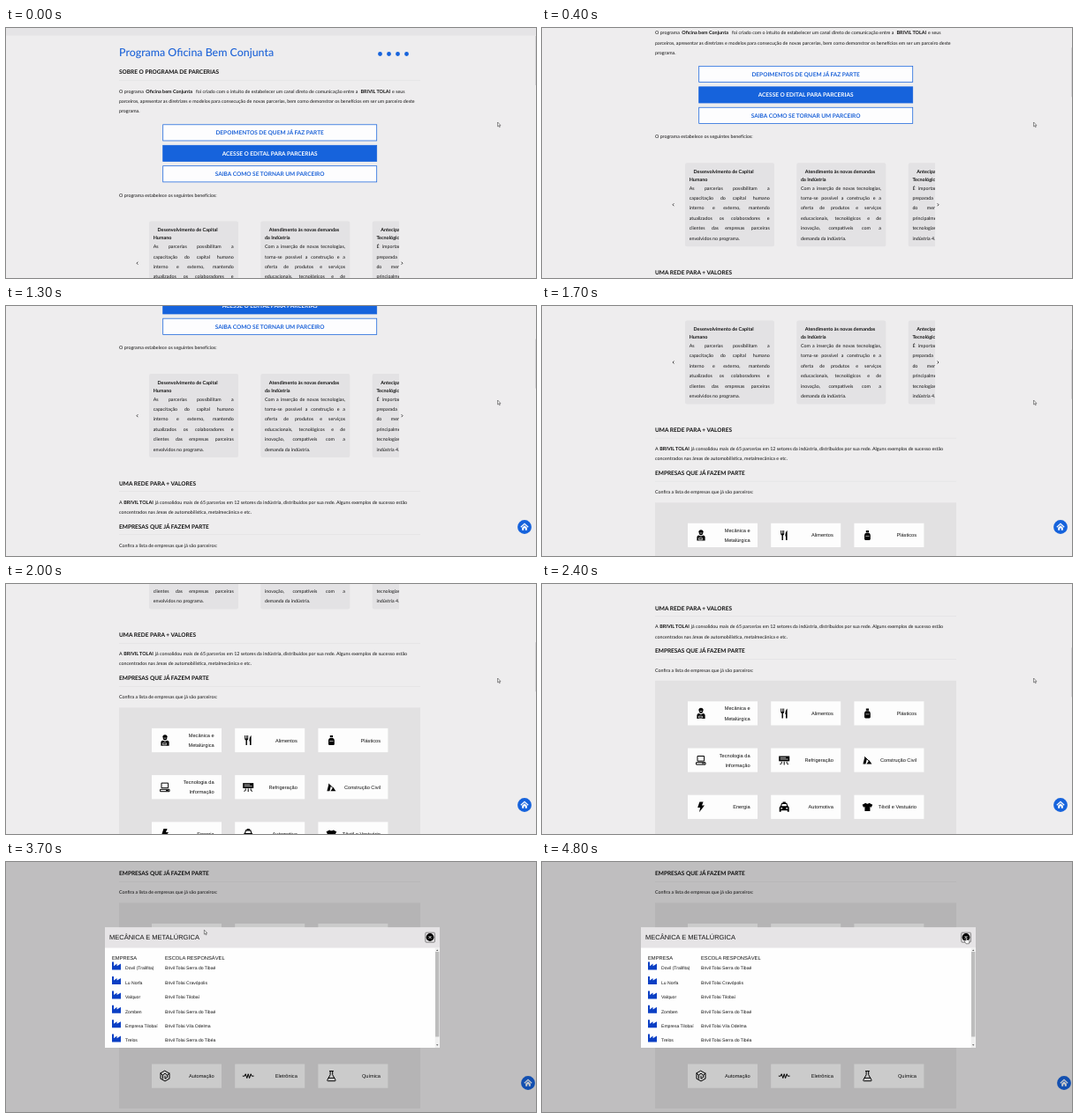
An HTML page for the animation above (5 s loop, 600 by 284 pixels).

```html
<!DOCTYPE html>
<html lang="pt-BR">
<head>
<meta charset="utf-8">
<title>Programa de parcerias</title>
<style>
  html, body { margin: 0; width: 100%; height: 100%; overflow: hidden; background: #eeedee; }
  svg { display: block; width: 100%; height: 100%; }
  text { font: 5.33px Lato, sans-serif; fill: #111; text-rendering: geometricPrecision; white-space: pre; }
  .bold, .head, .button { font-weight: 700; }
  .bold { font-size: 5.45px; }
  .head, .button { font-size: 6.5px; }
  .title { font-size: 12.4px; font-weight: 500; fill: #1d63d8; }
  .button { text-anchor: middle; fill: #1d63d8; }
  .filled { fill: #fff; }
  .sector, .cell, .column, .dialog { font-family: "Liberation Sans", Arial, sans-serif; }
  .sector { font-size: 5.65px; text-anchor: end; }
  .cell { font-size: 5.07px; }
  .column { font-size: 5.77px; }
  .dialog { font-size: 7.5px; }
  .line { fill: none; stroke: #000; stroke-width: 1; stroke-linejoin: round; stroke-linecap: round; }
</style>
</head>
<body>
<svg id="stage" viewBox="0 0 600 284" xmlns="http://www.w3.org/2000/svg"></svg>
<script>
const BLUE = '#1663dc';
const stage = document.getElementById('stage');

// y is the vertical middle of the capitals
const text = (x, y, str, cls = '', attrs = '') =>
  `<text x="${x}" y="${y}" dy=".35em" class="${cls}" ${attrs}>${str}</text>`;
const rect = (x, y, w, h, fill, attrs = '') =>
  `<rect x="${x}" y="${y}" width="${w}" height="${h}" fill="${fill}" ${attrs}/>`;
const bold = (str, x, next) =>
  `<tspan class="bold" x="${x}">${str}</tspan><tspan x="${next}">`;
const rule = y => rect(128, y, 341, 0.6, '#e0dfe1');

function button(y, label, filled) {
  return rect(177.7, y, 242, 18.2, filled ? BLUE : '#fdfdfe', `stroke="${BLUE}" stroke-width=".75"`) +
    text(298.6, y + 9.3, label, filled ? 'button filled' : 'button');
}

function benefit(x, heading, lines) {
  const body = lines.map((line, i) => {
    const last = i === lines.length - 1;
    return text(x + 4.7, 248.3 + i * 11.4, line, '', last ? '' : 'data-justify="91"');
  });
  return rect(x, 219.6, 101, 95, '#e3e2e4', 'rx="2"') +
    text(x + 9.5, 229.2, heading[0], 'bold') +
    text(x + 4.7, 238.3, heading[1], 'bold') + body.join('');
}

// Icons are drawn around 0,0
const sectors = [
  ['Mecânica e|Metalúrgica', '<path d="M-2.8-3.2Q-2.6-6.2 0-6.2T2.8-3.2H2.2V-1.6Q1.4 0 0 0T-2.2-1.6V-3.2zM-4.6 6.2V2Q-4.4.4-2.4.2L0 1.4 2.4.2Q4.4.4 4.6 2V6.2z"/><path d="M-1.2-2.4H1.2M-2.6 3.2H1.4V5.2H-2.6z" stroke="#fff" fill="none" stroke-width=".7"/>'],
  ['Alimentos', '<path d="M-4-5.5V-2Q-4 0-2.7 0V5.5H-1.3V0Q0 0 0-2V-5.5H-.8V-2H-1.5V-5.5H-2.4V-2H-3.2V-5.5zM1.8 5.5H3.4V-5.5Q1.2-4 1.2 1H1.8z"/>'],
  ['Plásticos', '<path d="M-1.6-5.5H1.6V-3.2H-1.6zM-1.6-2.6H1.6Q3.4-1.8 3.4 0V4.4Q3.4 5.5 2.2 5.5H-2.2Q-3.4 5.5-3.4 4.4V0Q-3.4-1.8-1.6-2.6z"/><path d="M-2.2 1H2.2" stroke="#fff" stroke-width=".6"/>'],
  ['Tecnologia da|Informação', '<path class="line" d="M-3.6-4.6H3.6V1H-3.6zM-5 2.6H5V5H-5zM1.5 3.8H3.5"/>'],
  ['Refrigeração', '<path d="M-6-4.6H6V1.2H-6z"/><path d="M-4.5-1H4.5M-4.5-2.8H2" stroke="#fff" stroke-width=".7"/><path class="line" d="M-3 2V3.4Q-3 4.6-4.4 4.6M0 2V5M3 2V3.4Q3 4.6 4.4 4.6"/>'],
  ['Construção Civil', '<path d="M-5 4.5L-3-3.5-.5-1.5-2 4.5zM-1 4.5L2 .2 5 4.5z"/><path class="line" d="M-3-3.5L2.4 1.5"/>'],
  ['Energia', '<path d="M-1.6-5.8H2.6L1-1.8H4L-2 6-.8.8H-3.8z"/>'],
  ['Automotiva', '<path d="M-1.6-5.8H1.6V-4.6H3L4.2-1Q5.5-.4 5.5 1V5.5H3.6V4H-3.6V5.5H-5.5V1Q-5.5-.4-4.2-1L-3-4.6H-1.6z"/><path d="M-2.3-3.3H2.3L3-1H-3zM-4 1H-2V2.2H-4zM2 1H4V2.2H2z" fill="#fff"/>'],
  ['Têxtil e Vestuário', '<path d="M-2-4.5Q0-2.8 2-4.5L5.8-2.6 4.4.4 3-.2V4.8H-3V-.2L-4.4.4-5.8-2.6z"/>'],
  ['Automação', '<path class="line" d="M0-5.8L5-3V3L0 5.8-5 3V-3zM-2.6 3V-1L0-3 2.6-1V1.5L0 3V0M-5-3L-2.6-1M2.6-1L5-3"/>'],
  ['Eletrônica', '<path class="line" d="M-6 0H-4L-3-2.4-1.4 2.4 0-2.4 1.4 2.4 3-2.4 4 0H6"/>'],
  ['Química', '<path class="line" d="M-2-5.6H2M-1.3-5.6V-1.4L-4.6 4.4Q-5 5.6-3.8 5.6H3.8Q5 5.6 4.6 4.4L1.3-1.4V-5.6M-3.2 2.2H3.2"/>'],
];

function tile([label, icon], i) {
  const x = 165 + (i % 3) * 94.2, y = 450 + Math.floor(i / 3) * 53.2;
  const lines = label.split('|');
  return rect(x, y, 79, 27.2, '#fdfdfd') +
    `<g transform="translate(${x + 15} ${y + 13.6})">${icon}</g>` +
    lines.map((line, n) =>
      text(x + 70.6, y + 13.7 + (n - (lines.length - 1) / 2) * 11.2, line, 'sector')).join('');
}

const page = `
  ${rect(0, 0, 600, 8.5, '#e5e4e6')}
  ${text(128, 28, 'Programa Oficina Bem Conjunta', 'title')}
  ${[423.5, 433.5, 443.5, 453.5].map(x => `<circle cx="${x}" cy="29.5" r="2.4" fill="${BLUE}"/>`).join('')}
  ${text(128, 50.2, 'SOBRE O PROGRAMA DE PARCERIAS', 'head')}${rule(59.5)}
  ${text(128, 72, 'O programa ' + bold('Oficina bem Conjunta', 158.3, 215) +
    'foi criado com o intuito de estabelecer um canal direto de comunicação entre a</tspan>' +
    bold('BRIVIL TOLAI', 401.5, 437) + 'e seus</tspan>')}
  ${text(128, 83.2, 'parceiros, apresentar as diretrizes e modelos para consecução de novas parcerias, bem como demonstrar os benefícios em ser um parceiro deste')}
  ${text(128, 94.5, 'programa.')}
  ${button(109.8, 'DEPOIMENTOS DE QUEM JÁ FAZ PARTE')}
  ${button(133.3, 'ACESSE O EDITAL PARA PARCERIAS', true)}
  ${button(156.7, 'SAIBA COMO SE TORNAR UM PARCEIRO')}
  ${text(128, 190, 'O programa estabelece os seguintes benefícios:')}
  <g clip-path="url(#carousel)">
    ${benefit(162, ['Desenvolvimento de Capital', 'Humano'], ['As parcerias possibilitam a',
      'capacitação do capital humano', 'interno e externo, mantendo', 'atualizados os colaboradores e',
      'clientes das empresas parceiras', 'envolvidos no programa.'])}
    ${benefit(288.3, ['Atendimento às novas demandas', 'da Indústria'], ['Com a inserção de novas tecnologias,',
      'torna-se possível a construção e a', 'oferta de produtos e serviços', 'educacionais, tecnológicos e de',
      'inovação, compatíveis com a', 'demanda da indústria.'])}
    ${benefit(414.7, ['Antecipação', 'Tecnológica'], ['É importante que a indústria esteja',
      'preparada para as tendências', 'do mercado com o foco', 'principalmente quanto às',
      'tecnologias ligadas à', 'indústria 4.0.'])}
  </g>
  <path class="line" style="stroke-width:.7" d="M149.1 266L148 267.2 149.1 268.4M447.9 266L449 267.2 447.9 268.4"/>
  ${text(128, 344.2, 'UMA REDE PARA + VALORES', 'head')}${rule(353)}
  ${text(128, 365.3, 'A ' + bold('BRIVIL TOLAI', 133.2, 168.7) +
    'já consolidou mais de 65 parcerias em 12 setores da indústria, distribuídos por sua rede. Alguns exemplos de sucesso estão</tspan>')}
  ${text(128, 376.6, 'concentrados nas áreas de automobilística, metalmecânica e etc.')}
  ${text(128, 392.8, 'EMPRESAS QUE JÁ FAZEM PARTE', 'head')}${rule(402)}
  ${text(128, 414.4, 'Confira a lista de empresas que já são parceiros:')}
  ${rect(128, 426.5, 341, 233.5, '#e2e1e2')}
  ${sectors.map(tile).join('')}`;

const partners = [
  ['Dovil (Tralifita)', 'Serra do Tibaé'],
  ['Lu Norfa', 'Cravópolis'],
  ['Valquor', 'Tilobaí'],
  ['Zomben', 'Serra do Tibaé'],
  ['Empresa Tilobaí', 'Vila Odelma'],
  ['Trelos', 'Serra do Tibéa'],
];

const partnerRow = ([company, place], i) => {
  const y = 120.6 + i * 16.4;
  return `<path transform="translate(120 ${y - 7})" fill="#0b3fc4" d="M0 9V0H2V4.6L5.6 2V4.6L10 2V9z"/>` +
    text(135, y, company, 'cell') + text(180, y, 'Brivil Tolai ' + place, 'cell');
};

const modal = `
  ${rect(0, 0, 600, 284, '#000', 'opacity=".2"')}
  ${rect(112, 74.5, 379, 136.5, '#fefefe')}
  ${rect(112, 74.5, 379, 23, '#e6e4e6')}
  ${text(117, 85.8, 'MECÂNICA E METALÚRGICA', 'dialog')}
  ${text(120, 108.6, 'EMPRESA', 'column')}${text(180, 108.6, 'ESCOLA RESPONSÁVEL', 'column')}
  ${partners.map(partnerRow).join('')}
  ${rect(485.7, 97.5, 5, 113.5, '#f0f0f0')}${rect(486, 102, 4.4, 96.5, '#bdbdbd')}
  <path d="M487 101L488.2 99.4 489.4 101zM487 207.2L488.2 208.8 489.4 207.2z" fill="#555"/>
  ${rect(474.8, 80.2, 10.6, 11, 'none', 'rx="1" stroke="#444" stroke-width=".6"')}
  <circle cx="480" cy="85.5" r="4.4"/>
  <path d="M478.6 84.1L481.4 86.9M481.4 84.1L478.6 86.9" stroke="#fff" stroke-width=".9"/>`;

stage.innerHTML = `
  <clipPath id="carousel"><rect x="160" y="215" width="285" height="104"/></clipPath>
  ${rect(0, 0, 600, 284, '#eeedee')}
  <g id="page">${page}</g>
  <g id="thumb">${rect(599, 9, 1, 56, '#d4d3d5')}</g>
  <g id="home">
    <circle r="7.9" fill="${BLUE}"/>
    <path d="M-4.2.2L0-3.6 4.2.2" fill="none" stroke="#fff" stroke-width="1.2"/>
    <path d="M-2.8.8L0-1.7 2.8.8V3.8H.8V1.6H-.8V3.8H-2.8z" fill="#fff"/>
  </g>
  <g id="modal">${modal}</g>
  <g id="cursor" fill="#fff" stroke="#222" stroke-width=".5" stroke-linejoin="round">
    <path id="arrow" d="M0 0V4.9L1.1 3.9 1.9 5.7 2.7 5.3 1.9 3.6H3.4z"/>
    <path id="hand" d="M-.5.5Q0-.4.5.5V2.6L3 3.2Q3.7 3.5 3.5 4.4L2.9 7.2H-.4L-2 4.7Q-2-.1-.5 4z"/>
  </g>`;

for (const el of stage.querySelectorAll('[data-justify]')) {
  const gaps = el.textContent.split(' ').length - 1;
  el.style.wordSpacing = (el.dataset.justify - el.getComputedTextLength()) / gaps + 'px';
}

const [pageEl, thumbEl, homeEl, modalEl, cursorEl, arrowEl, handEl] =
  ['page', 'thumb', 'home', 'modal', 'cursor', 'arrow', 'hand'].map(id => document.getElementById(id));

const clamp = u => Math.min(1, Math.max(0, u));
const ease = u => u * u * (3 - 2 * u);

// start, end, distance in wheel notches
const NOTCH = 31.67;
const scrolls = [[50, 600, 3], [1080, 1520, 3], [1575, 2200, 4], [2620, 3200, 2]];
const scrollAt = t => NOTCH * scrolls.reduce(
  (sum, [start, end, notches]) => sum + notches * ease(clamp((t - start) / (end - start))), 0);

// time, x, y
const cursorPath = [[0, 556.6, 107], [2650, 556.6, 107], [3200, 236, 84], [3500, 224.4, 77.2],
  [3700, 224.4, 77.2], [4200, 498, 89], [4300, 508, 90], [4400, 508, 90], [4800, 480.4, 85.6], [5000, 480.4, 85.6]];

function cursorAt(t) {
  const i = cursorPath.findIndex(p => p[0] > t);
  const [t0, x0, y0] = cursorPath[i - 1], [t1, x1, y1] = cursorPath[i];
  const u = ease((t - t0) / (t1 - t0));
  return [x0 + (x1 - x0) * u, y0 + (y1 - y0) * u];
}

const show = (el, on) => el.setAttribute('visibility', on ? 'visible' : 'hidden');
const move = (el, x, y) => el.setAttribute('transform', `translate(${x} ${y})`);

function draw(now) {
  const t = Math.floor((now % 5000) / 100) * 100; // ten pictures a second
  const open = t >= 3700;
  const pointing = (t >= 3200 && !open) || t >= 4700;
  const scroll = scrollAt(t);
  move(pageEl, 0, -scroll);
  move(thumbEl, 0, scroll * 0.2);
  show(thumbEl, !open);
  move(homeEl, open ? 591 : 587, 251);
  homeEl.setAttribute('opacity', clamp((t - 600) / 200));
  show(modalEl, open);
  move(cursorEl, ...cursorAt(t));
  show(arrowEl, !pointing);
  show(handEl, pointing);
}

const start = performance.now();
function tick() {
  draw(performance.now() - start);
  requestAnimationFrame(tick);
}
tick();
</script>
</body>
</html>
```
